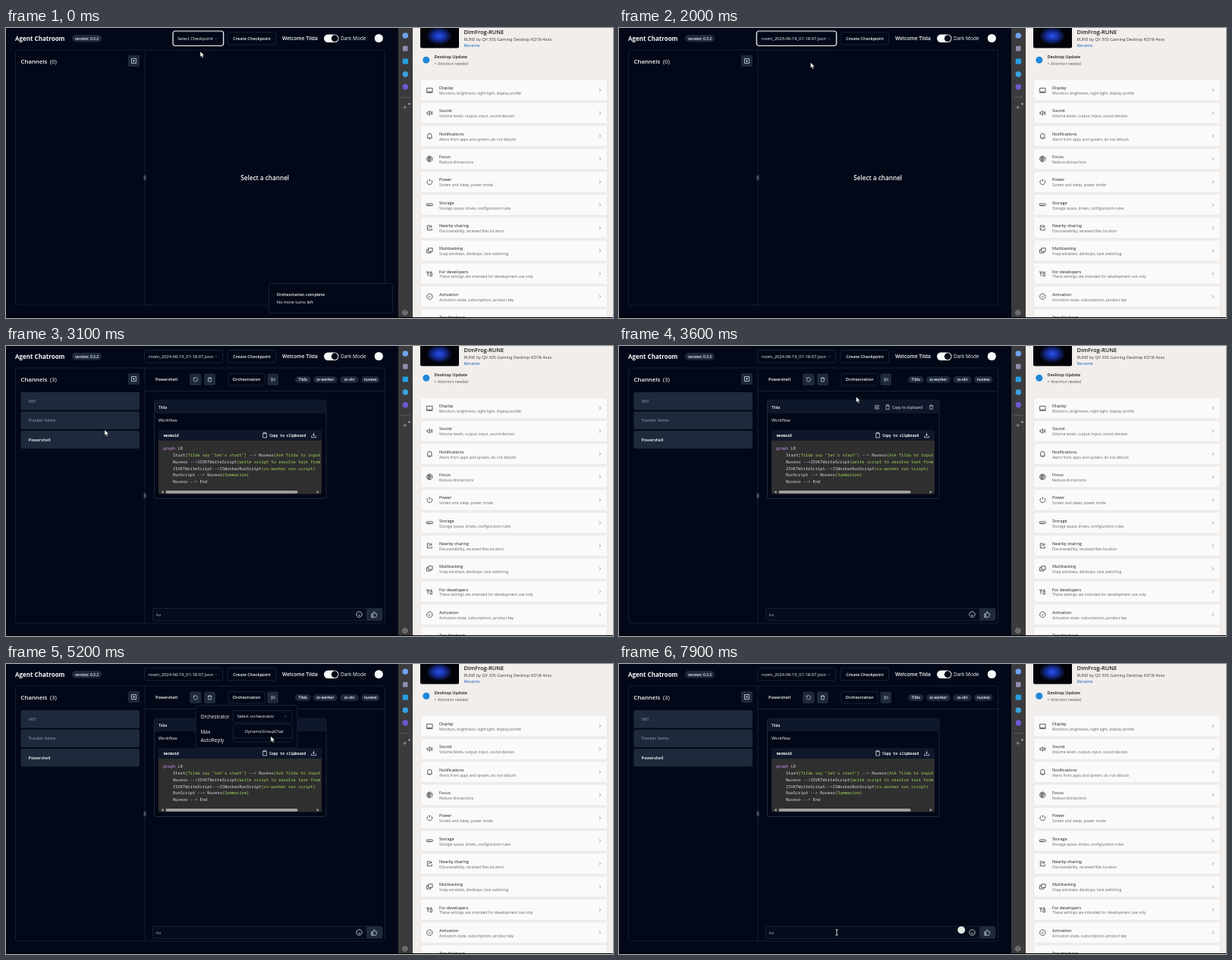
Animation, 800 px wide and 383 px high, one loop 8 s. Source, as an HTML page:

```html
<!DOCTYPE html>
<html lang="en">
<head>
<meta charset="utf-8">
<title>Agent Chatroom</title>
<style>
html, body { margin: 0; width: 100%; height: 100%; overflow: hidden; background: #020817; }
svg { display: block; width: 100vw; height: 100vh; font-family: "Open Sans", "Noto Sans", sans-serif; }
.mono { font-family: "Noto Sans Mono", "DejaVu Sans Mono", monospace; }
</style>
</head>
<body>
<svg id="stage" viewBox="0 0 800 383"></svg>
<script>
const BG = '#020817', LINE = '#1e293b', PALE = '#f8fafc', MUTED = '#7f8a9b', INK = '#1b1b1b';

const box = (x, y, x2, y2, fill, stroke = 'none', r = 2, w = .8) =>
  `<rect x="${x}" y="${y}" width="${x2 - x}" height="${y2 - y}" rx="${r}" fill="${fill}" stroke="${stroke}" stroke-width="${w}"/>`;
const text = (x, y, size, str, fill = PALE, weight = 400, extra = '') =>
  `<text x="${x}" y="${y}" font-size="${size}" fill="${fill}" font-weight="${weight}" ${extra}>${str}</text>`;
const mid = (x, y, size, str, fill, weight) => text(x, y, size, str, fill, weight, 'text-anchor="middle"');
const dot = (x, y, r, fill) => `<circle cx="${x}" cy="${y}" r="${r}" fill="${fill}"/>`;
const line = (x, y, x2, y2, stroke = LINE, w = .8) =>
  `<path d="M${x} ${y}L${x2} ${y2}" stroke="${stroke}" stroke-width="${w}"/>`;
const group = (id, body) => `<g id="${id}">${body}</g>`;

// Icons live on a 24-unit grid, centred on x, y.
const icons = {
  copy: 'M8 8h13v13H8zM4 16V3h13',
  gear: 'M12 2l8.5 5v10L12 22l-8.5-5V7zM12 8.5a3.5 3.5 0 1 0 .01 0',
  trash: 'M3 6h18M5 6l1 15h12l1-15M9 6V3h6v3',
  reset: 'M3 12a9 9 0 1 0 3-6.7L3 8M3 3v5h5',
  step: 'M6 4l10 8-10 8zM20 5v14',
  edit: 'M12 4H4v16h16v-8M9 15l1-4 9-9 3 3-9 9z',
  clip: 'M8 4H5v18h14V4h-3M8 2h8v4H8z',
  save: 'M12 3v12M7 10l5 5 5-5M3 15v6h18v-6',
  smile: 'M12 2a10 10 0 1 0 .01 0M8 14q4 4 8 0M9 9v.5M15 9v.5',
  like: 'M7 10v12M2 10h5v12H2zM7 10l4-8q3 0 3 3v4h6q2 0 1 3l-2 8q-.5 2-2 2H7',
  add: 'M3 3h18v18H3zM8 12h8M12 8v8',
  plus: 'M12 3v18M3 12h18',
  down: 'M6 9l6 6 6-6',
  right: 'M9 5l7 7-7 7',
  display: 'M2 5h20v13H2zM1 21h22',
  sound: 'M3 9h4l5-5v16l-5-5H3zM16 8q3 4 0 8M19 5q5 7 0 14',
  bell: 'M5 17v-7a7 7 0 0 1 14 0v7l2 2H3zM9 22h6',
  focus: 'M12 2a10 10 0 1 0 .01 0M12 7a5 5 0 1 0 .01 0M12 12l6-6M12 3v18M7 4v16',
  power: 'M7 5a9 9 0 1 0 10 0M12 2v9',
  drive: 'M3 8h18q2 0 2 3.500t-2 3.500H3q-2 0-2-3.500T3 8M4 14h12',
  share: 'M13 4H4v16h16v-6M9 14q1-7 9-7M15 3l5 4-5 4',
  tasks: 'M8 3h14v12H8zM8 8H2v12h14v-5',
  tools: 'M6 9v12M3 3v6h6V3M17 3v6M14 9h6v12h-6z',
  check: 'M12 2a10 10 0 1 0 .01 0M7.500 12l3 3 6-6'
};
const icon = (x, y, name, size = 8, color = PALE, w = 2) =>
  `<path transform="translate(${x - size / 2} ${y - size / 2}) scale(${size / 24})" d="${icons[name]}"
    fill="none" stroke="${color}" stroke-width="${w}" stroke-linejoin="round"/>`;

function topBar() {
  return text(12, 17, 8, 'Agent Chatroom', PALE, 700)
    + box(87, 9, 126, 18.5, LINE, 'none', 4.7) + mid(106.500, 15.500, 4.9, 'version: 0.3.2', PALE, 600)
    + group('pick', box(221.500, 5.500, 285.500, 22, BG, LINE) + text(226, 15.800, 5.7, 'Select Checkpoint'))
    + group('picked', box(182.500, 5.500, 285.500, 22, BG, LINE) + text(188, 15.800, 5.7, 'room_2024-06-19_01-18-07.json'))
    + icon(277, 14, 'down', 6, MUTED)
    + `<rect id="ring" y="4" height="19.500" rx="3.500" fill="none" stroke="${PALE}" stroke-width="1.200"/>`
    + box(292, 5.500, 355.500, 22, BG, LINE) + mid(324, 15.800, 5.6, 'Create Checkpoint', PALE, 600)
    + text(364, 16.300, 6.7, 'Welcome Tilda', PALE, 600)
    + box(419, 8.500, 438.500, 19, PALE, 'none', 5.2) + dot(433.200, 13.750, 4.4, BG)
    + text(441, 16.300, 6.5, 'Dark Mode') + dot(491.300, 13.500, 5.600, PALE);
}

function channelList() {
  const row = (y, name, color) => box(19.500, y, 176, y + 23.500, LINE) + text(29.500, y + 13.800, 5.5, name, color, 600);
  return box(12.500, 29, 499.500, 366, 'none', LINE, 3, .7) + line(183, 29, 183, 366, LINE, .7)
    + box(181.200, 194, 184.800, 201.500, '#273449', 'none', 1) + line(183, 196, 183, 199.500, '#94a3b8')
    + text(19.500, 46.500, 7.8, 'Channels', PALE, 600)
    + text(57.700, 46.500, 7.8, '(<tspan id="count">0</tspan>)')
    + box(161, 36, 176, 51, LINE) + icon(168.500, 43.500, 'add', 8)
    + group('rows', row(61, 'VKT', MUTED) + row(86.500, 'Tracker Items', MUTED) + row(112, 'Powershell', PALE))
    + group('rowIcons', icon(137.500, 123.700, 'copy', 7) + icon(149, 123.700, 'gear', 7) + icon(160, 123.700, 'trash', 7));
}

function codeBlock() {
  const lines = [
    ['graph LR', 0],
    ['Start[Tilda say "let\'s start"] --> Nuvexo{Ask Tilda to input', 1],
    ['Nuvexo -->ZSVKTWriteScript{write script to resolve task from', 1],
    ['ZSVKTWriteScript-->ZSWorkerRunScript{zs-worker run script}', 1],
    ['RunScript --> Nuvexo{Summarize}', 1],
    ['Nuvexo --> End', 1]
  ];
  const paint = s => s
    .replace(/\[.*?\]|\{[^}]*\}?/g, '<tspan fill="#a3d75a">$&</tspan>')
    .replace(/-->/g, '<tspan fill="#b9dbe6">--&gt;</tspan>')
    .replace('graph', '<tspan fill="#c792ea">graph</tspan>');
  return box(201, 111, 416, 195.500, '#2f2f2f') + box(201, 111, 416, 125, '#0f172a', 'none', 1)
    + `<g class="mono">${text(207.700, 119.500, 4.75, 'mermaid', PALE, 600)}${text(347.300, 119.500, 4.7, 'Copy to clipboard', PALE, 600)}`
    + lines.map(([s, indent], i) => text(207 + indent * 13, 137 + i * 8.850, 5.4, paint(s), '#dedede')).join('') + '</g>'
    + icon(341, 117.700, 'clip', 8) + icon(405.500, 117.700, 'save', 8)
    + box(210.500, 191, 384.500, 194.800, '#a0a0a0', 'none', 1.9)
    + '<path d="M207.500 190.700v4.200l-3-2.100zM409.700 190.700v4.200l3-2.100z" fill="#a0a0a0"/>';
}

function room() {
  const badge = (x, x2, name) => box(x, 40, x2, 48.700, LINE, 'none', 4.300) + mid((x + x2) / 2, 46, 4.9, name, PALE, 600);
  return text(197, 46.300, 5.5, 'Powershell', PALE, 600)
    + box(242, 36.500, 257.500, 52, LINE) + icon(249.800, 44.300, 'reset', 7)
    + box(261, 36.500, 276, 52, LINE) + icon(268.500, 44.300, 'trash', 7)
    + box(293, 36.500, 341, 52, BG, LINE) + mid(317, 46.300, 5.5, 'Orchestration', PALE, 600)
    + box(344.500, 36.500, 359, 52, LINE) + icon(351.800, 44.300, 'step', 7)
    + badge(381, 401.500, 'Tilda') + badge(405, 436.500, 'zs-worker') + badge(440.500, 464.500, 'zs-vkt') + badge(468, 492.500, 'nuvexo')
    + line(183, 59.500, 499.500, 59.500)
    + box(195.500, 72, 422, 201.500, BG, '#26334a') + box(196, 72.500, 421.500, 89, '#0f172a', 'none', 1)
    + text(201, 82.700, 4.9, 'Tilda', PALE, 600) + text(201, 100.300, 5.6, 'Workflow')
    + group('cardTools', icon(340, 80.700, 'edit', 7) + icon(354, 80.700, 'clip', 7)
      + text(360, 82.700, 4.9, 'Copy to clipboard') + icon(411.500, 80.700, 'trash', 7))
    + codeBlock()
    + box(193.500, 346.500, 496, 362.500, '#050c1c', LINE) + text(197.500, 356.800, 5.5, 'Aa', '#94a3b8')
    + group('caret', line(197.200, 350, 197.200, 358.500, PALE, .6))
    + icon(465.500, 354.500, 'smile', 9) + box(475, 346.500, 496, 362.500, LINE) + icon(485.300, 354.500, 'like', 9, '#cbd5e1');
}

function orchestrationMenu() {
  return box(250, 54.500, 384, 111, BG, LINE, 3)
    + text(256.500, 71.800, 6.4, 'Orchestrator') + text(256.500, 92, 6.5, 'Max') + text(256.500, 102.500, 6.5, 'AutoReply')
    + box(299.500, 61.500, 377, 77.500, BG, LINE) + icon(368.500, 69.300, 'down', 7, MUTED)
    + group('unset', text(304.800, 71.300, 5.55, 'Select orchestrator'))
    + group('set', text(304.800, 71.300, 5.55, 'DynamicGroupChat'))
    + box(299.500, 86.500, 377, 103, BG, LINE) + text(304.800, 96.800, 5.5, '10')
    + group('options', box(299.500, 79.500, 377.500, 97.500, BG, LINE) + text(315, 90.600, 5.55, 'DynamicGroupChat'));
}

function sideStrip() {
  return box(517, 0, 536, 383, '#3b3b3e', 'none', 0)
    + dot(526.300, 10, 3.800, '#6fa3ee') + box(523, 23.700, 529.500, 30.500, '#8e8fae', 'none', 1)
    + box(522.700, 40.500, 530, 47.500, '#259fe2', 'none', 1) + dot(526.300, 61, 3.700, '#38a3e0') + dot(526.300, 77.800, 3.700, '#6a5bd2')
    + line(520, 91.500, 532, 91.500, '#66666a', .7) + icon(525.700, 104.700, 'plus', 6.500, '#c9c9cc') + dot(531.500, 100.300, 1.100, '#d7d7da')
    + icon(525.800, 376, 'gear', 8, '#d2d2d4');
}

function settings() {
  const rows = [
    ['display', 'Display', 'Monitors, brightness, night light, display profile'],
    ['sound', 'Sound', 'Volume levels, output, input, sound devices'],
    ['bell', 'Notifications', 'Alerts from apps and system, do not disturb'],
    ['focus', 'Focus', 'Reduce distractions'],
    ['power', 'Power', 'Screen and sleep, power mode'],
    ['drive', 'Storage', 'Storage space, drives, configuration rules'],
    ['share', 'Nearby sharing', 'Discoverability, received files location'],
    ['tasks', 'Multitasking', 'Snap windows, desktops, task switching'],
    ['tools', 'For developers', 'These settings are intended for development use only'],
    ['check', 'Activation', 'Activation state, subscriptions, product key'],
    ['tools', 'Troubleshoot', '']
  ];
  return box(536, 0, 800, 383, '#f1eeec', 'none', 0)
    + box(546, -5, 597, 26.500, '#030409', 'none', 2) + '<ellipse cx="571" cy="10.500" rx="17" ry="12" fill="url(#glow)"/>'
    + text(603.500, 8, 7.4, 'DimFrog-RUNE', INK, 600)
    + text(603.500, 16.800, 5.57, 'RUNE by QV 30S Gaming Desktop KD18-4xxx', '#3a3a3a')
    + text(603.500, 24.800, 5.4, 'Rename', '#0f62b5')
    + dot(553.800, 42.300, 4.500, '#2088d8') + text(564.500, 40.300, 5.6, 'Desktop Update', INK, 600)
    + dot(565.800, 47, .8, '#5b5b5b') + text(569, 48.700, 4.95, 'Attention needed', '#5b5b5b')
    + rows.map(([name, title, note], i) => {
        const y = 82 + i * 30.300;
        return box(546.500, y - 14, 792.500, y + 14, '#fbfafa', '#e6e3e1', 2, .7)
          + icon(558.300, y, name, 9, '#2b2b2b', 2) + icon(782.700, y, 'right', 6.500, '#4a4a4a')
          + text(571, y - .9, 5.5, title, INK) + text(571, y + 6, 4.95, note, '#666');
      }).join('')
    + box(0, 382, 800, 383, '#000', 'none', 0);
}

const stage = document.getElementById('stage');
stage.innerHTML = `<defs><radialGradient id="glow"><stop stop-color="#2a50f0"/><stop offset=".45" stop-color="#1730a0"/>
    <stop offset="1" stop-color="#030409"/></radialGradient></defs>`
  + box(0, 0, 800, 383, BG, 'none', 0) + topBar() + channelList()
  + group('empty', mid(341.200, 200.800, 8.2, 'Select a channel', PALE, 600))
  + group('room', room()) + group('menu', orchestrationMenu())
  + group('files', box(219, 26, 341, 56.500, BG, LINE) + box(221.500, 31, 338.500, 51, LINE) + text(238, 43.500, 5.7, 'room_2024-06-19_01-18-07.json'))
  + group('toast', box(346.500, 337.500, 509.500, 376.500, BG, LINE, 3)
    + text(356.800, 354.300, 5.5, 'Orchestration complete', PALE, 600) + text(356.800, 364, 5.6, 'No more turns left'))
  + group('badge', dot(451.200, 351.300, 4.900, '#dfe9e2'))
  + sideStrip() + settings()
  + group('arrow', '<path d="M0 0v7.300l1.700-1.500 1.200 2.700 1.300-.6-1.200-2.600h2.300z" fill="#fff" stroke="#111" stroke-width=".4"/>')
  + group('beam', '<path d="M-1.600-3.500h3.200M0-3.500v7M-1.600 3.500h3.200" stroke="#fff" stroke-width=".8"/>');

const part = Object.fromEntries([...stage.querySelectorAll('[id]')].map(e => [e.id, e]));

// time, x, y of the pointer
const path = [
  [0, 256, 31], [100, 256, 31], [200, 255, 30.500], [300, 255, 30.500], [400, 257, 15], [1000, 257, 15],
  [1500, 252.500, 45.500], [2000, 252.500, 45.500], [2700, 94, 119], [2800, 93.500, 119.500], [3000, 93.500, 119.500],
  [3600, 312.500, 67], [4100, 318, 45], [4500, 318, 45], [4800, 338, 69], [4900, 338, 69], [5200, 349, 95.500],
  [5400, 349, 93], [5900, 350, 92], [6400, 305.500, 287], [6600, 305.500, 287], [7200, 287, 354.500], [8000, 287, 354.500]
];

function pointer(t) {
  const i = path.findIndex(p => p[0] > t), [t0, x0, y0] = path[i - 1], [t1, x1, y1] = path[i];
  const k = (t - t0) / (t1 - t0);
  return [x0 + (x1 - x0) * k, y0 + (y1 - y0) * k];
}

function draw(now) {
  const t = Math.floor(now % 8000 / 100) * 100;
  const within = (a, b = 8000) => t >= a && t < b;
  const visible = {
    toast: within(0, 600), files: within(1000, 1900), ring: within(0, 1000) || within(1900, 3000),
    pick: within(0, 1900), picked: within(1900), rows: within(2300), rowIcons: within(2600, 3100),
    empty: within(0, 3000), room: within(3000), cardTools: within(3500, 3800), menu: within(4200, 6700),
    options: within(4900, 5500), unset: within(0, 5500), set: within(5500),
    caret: within(7300, 7500), badge: within(7200), arrow: within(0, 7100), beam: within(7100)
  };
  for (const id in visible) part[id].style.display = visible[id] ? '' : 'none';
  part.count.textContent = t < 2300 ? 0 : 3;
  const left = t < 1900 ? 220 : 181.300;
  part.ring.setAttribute('x', left);
  part.ring.setAttribute('width', 286.700 - left);
  const move = `translate(${pointer(t)})`;
  part.arrow.setAttribute('transform', move);
  part.beam.setAttribute('transform', move);
  requestAnimationFrame(draw);
}
requestAnimationFrame(draw);
</script>
</body>
</html>
```
